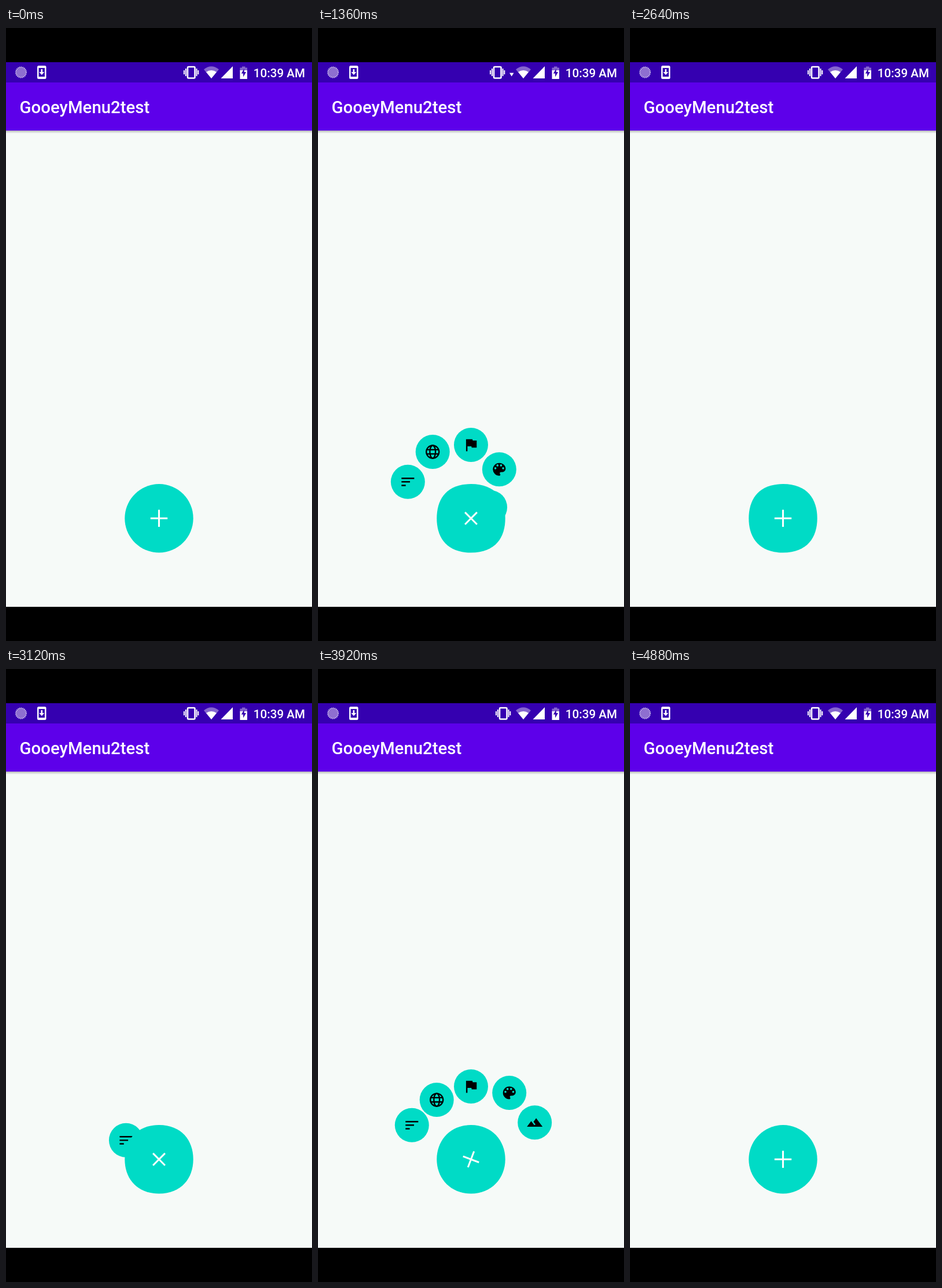
Write an HTML page that moves like this. It is 529 by 1058 pixels and loops after 4960 ms.

```html
<!DOCTYPE html>
<html lang="en">
<head>
<meta charset="utf-8">
<title>Gooey menu</title>
<style>
html, body { margin: 0; width: 100%; height: 100%; overflow: hidden; background: #000; }
svg { display: block; width: 100vw; height: 100vh; }
text { font-family: Roboto, sans-serif; font-weight: 500; fill: #fff; }
.teal { fill: #00dbc6; }
</style>
</head>
<body>
<svg viewBox="0 0 529 1058">
  <defs>
    <linearGradient id="shade" x2="0" y2="1">
      <stop stop-color="#000" stop-opacity=".26"/>
      <stop offset="1" stop-color="#000" stop-opacity="0"/>
    </linearGradient>
  </defs>
  <rect y="59" width="529" height="940" fill="#f6faf8"/>
  <rect y="59" width="529" height="35" fill="#3500b0"/>
  <rect y="94" width="529" height="83" fill="#5d00ea"/>
  <rect y="177" width="529" height="5" fill="url(#shade)"/>
  <text x="23.5" y="146.5" font-size="29.4">GooeyMenu2test</text>
  <text x="517" y="84.5" font-size="20.6" text-anchor="end">10:39 AM</text>

  <!-- status bar icons -->
  <circle cx="26" cy="76.500" r="9" fill="#8e6fd0"/>
  <circle cx="26" cy="76.500" r="9" fill="none" stroke="#d5c8f0" stroke-width="2" stroke-dasharray="1.500 1.300"/>
  <rect x="54" y="65" width="15.500" height="23" rx="2.500" fill="#fff"/>
  <path d="M56.500 69h10.500v15h-10.500z" fill="#3500b0"/>
  <path d="M60.500 71h2.600v5h3.200l-4.500 5-4.500-5h3.200z" fill="#fff"/>
  <g id="buzz" fill="none" stroke="#fff" stroke-width="2">
    <rect x="314" y="67" width="12.500" height="19.500" rx="1.500" stroke-width="2.500"/>
    <path d="M311 70v13M308 73v7M329.500 70v13M332.300 73v7"/>
  </g>
  <path id="arrow" d="M331 77.500h7.500l-3.800 6z" fill="#fff"/>
  <path d="M342 71.500q13-10.500 26 0l-13 15.500z" fill="#fff" opacity=".4"/>
  <path d="M346 76q9-6 18 0l-9 11z" fill="#fff"/>
  <path d="M392 66v21h-20.500z" fill="#fff"/>
  <path d="M404.500 68.500h3.500v-2h5.500v2h3.500v6h-12.500z" fill="#fff" opacity=".4"/>
  <path d="M404.500 73h12.500v15h-12.500z" fill="#fff"/>
  <path d="M411.800 70l-5 8.500h3.300v6l5-8.500h-3.300z" fill="#3500b0"/>

  <!-- menu buttons, left to right -->
  <g class="item"><path d="M3 18h6v-2H3zM3 6v2h18V6zm0 7h12v-2H3z"/></g>
  <g class="item"><g fill="none" stroke="#000" stroke-width="1.900">
    <circle cx="12" cy="12" r="9"/><ellipse cx="12" cy="12" rx="4" ry="9"/><path d="M4 9h16M4 15h16"/>
  </g></g>
  <g class="item"><path d="M14.400 6L14 4H5v17h2v-7h5.600l.4 2h7V6z"/></g>
  <g class="item">
    <path d="M12 3a9 9 0 0 0 0 18c1.300 0 2-1.500 1.100-2.500-.9-1 0-2.500 1.100-2.500H16c2.760 0 5-2.240 5-5 0-4.420-4.030-8-9-8z"/>
    <path d="M6.500 10.500h0M9.500 6.500h0M14.500 6.500h0M17.500 10.500h0" stroke="#00dbc6" stroke-width="3" stroke-linecap="round"/>
  </g>
  <g class="item"><path d="M14 6l-3.750 5 2.850 3.800-1.600 1.200C9.810 13.750 7 10 7 10l-6 8h22z"/></g>

  <g transform="translate(264.5 846.3)">
    <path id="fab" class="teal"/>
    <path id="plus" d="M-14.700 0h29.400M0-14.700v29.400" stroke="#fff" stroke-width="3"/>
    <g id="touch" transform="translate(6.5 21)">
      <circle r="19" fill="#20c8b4" opacity=".35"/>
      <circle r="15" fill="#fff" opacity=".28"/>
    </g>
  </g>
</svg>
<script>
const LOOP = 4960, STEP = 80, SPAN = 400;
const TAPS = [973, 2002, 2876, 3788]; // open, close, open, close
const CX = 264.5, CY = 846.3, R = 59.2, GAP = 118, ROUND = 0.5519;

const $ = id => document.getElementById(id);
const clamp = v => Math.min(1, Math.max(0, v));
const show = (el, on) => el.setAttribute('visibility', on ? 'visible' : 'hidden');

const items = [...document.querySelectorAll('.item')];
for (const item of items) {
  const icon = item.innerHTML;
  item.innerHTML = `<circle r="29.5" class="teal"/><g transform="scale(1.225) translate(-12 -12)">${icon}</g>`;
}

// Pulls back, then overshoots
function swing(p) {
  p = clamp(p);
  if (p < 0.5) {
    const v = 2 * p;
    return v * v * (4 * v - 3) / 2;
  }
  const u = 2 * p - 2;
  return u * u * (4 * u + 3) / 2 + 1;
}

// Five alternating swells, then a slow release
function wobble(p) {
  if (p < 0.25) return 0;
  if (p > 1.5) return 0.2 * (1 - clamp((p - 1.5) / 0.5));
  const phase = (p / 0.25 - 1) % 2;
  return 0.22 * (1 - Math.abs(phase - 1)) - 0.02;
}

function blob(bulge) {
  const k = ROUND * R, c = (ROUND + bulge) * R;
  return `M0 ${R}C${c} ${R} ${R} ${k} ${R} 0C${R} ${-k} ${c} ${-R} 0 ${-R}` +
    `C${-c} ${-R} ${-R} ${-k} ${-R} 0C${-R} ${k} ${-c} ${R} 0 ${R}Z`;
}

function draw(t) {
  const tap = TAPS.filter(at => at <= t).length - 1;
  const open = tap % 2 === 0;
  const p = tap < 0 ? 9 : (t - TAPS[tap]) / SPAN;

  items.forEach((item, i) => {
    const s = swing(p - (open ? i + 1 : 4 - i) / 10);
    const reach = GAP * (open ? s : 1 - s);
    const angle = (i + 1) * Math.PI / 6;
    const x = CX - reach * Math.cos(angle), y = CY - reach * Math.sin(angle);
    item.setAttribute('transform', `translate(${x} ${y})`);
  });

  const turn = clamp(p / 0.45) ** 2;
  $('plus').setAttribute('transform', `rotate(${45 * (open ? turn : 1 - turn)})`);
  $('fab').setAttribute('d', blob(wobble(p)));
  show($('touch'), TAPS.some(at => t > at - 95 && t < at + 100));

  const busy = t >= 960 && t < 2000;
  show($('arrow'), busy);
  $('buzz').setAttribute('transform', `translate(${busy ? -10 : 0})`);
}

function tick() {
  const t = performance.now() % LOOP;
  draw(Math.floor(t / STEP) * STEP);
  requestAnimationFrame(tick);
}
tick();
</script>
</body>
</html>
```
